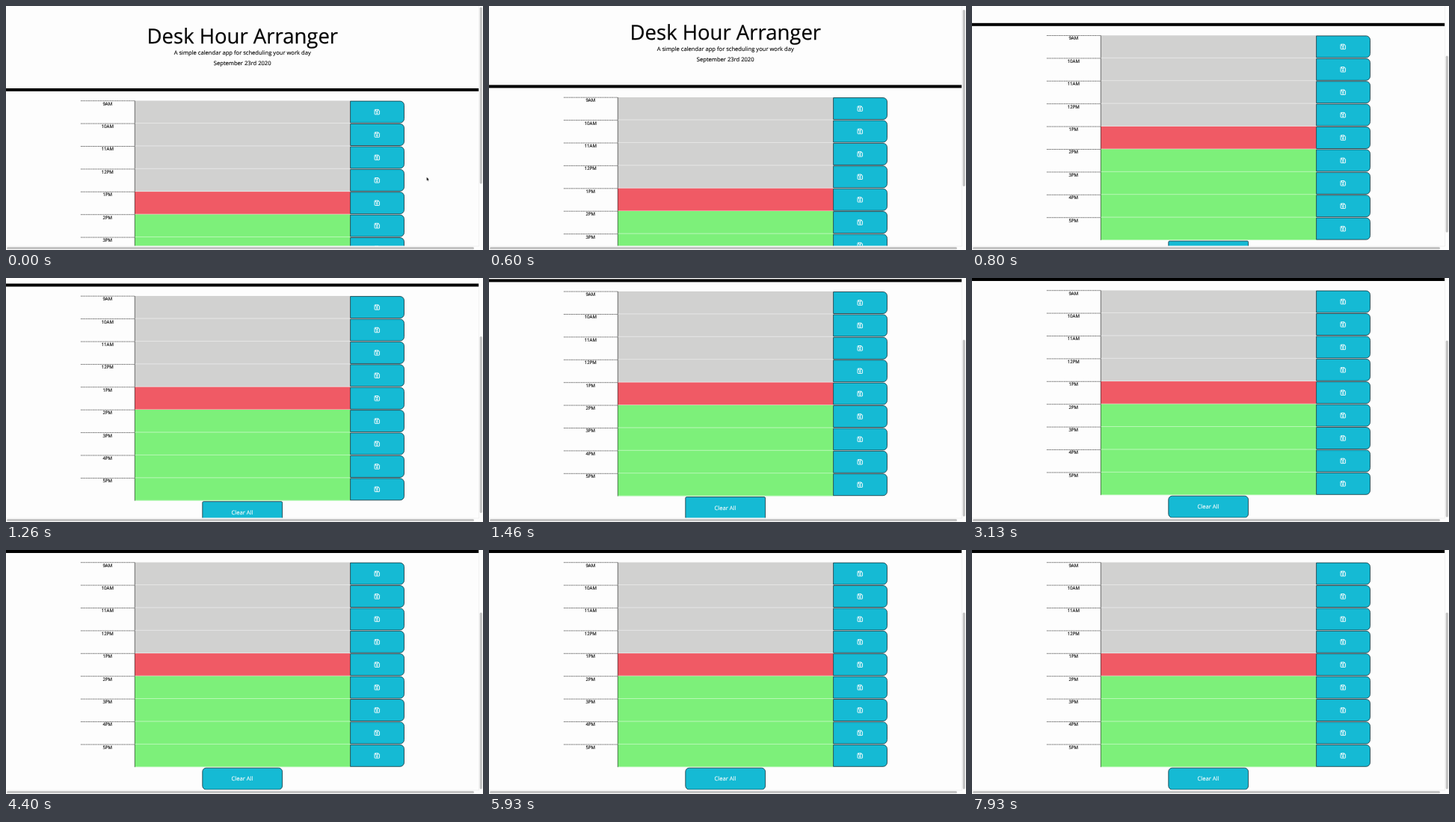
Animation of 638x326 px, one loop 8000 ms. Source, as an HTML page:

```html
<!DOCTYPE html>
<html lang="en">
<head>
<meta charset="utf-8">
<title>Day planner</title>
<style>
  @property --scroll { syntax: "<number>"; inherits: true; initial-value: 0; }

  html, body { margin: 0; width: 100%; height: 100%; overflow: hidden; background: #fdfdfd; }
  #stage {
    display: block; width: 638px; height: 326px;
    font-family: "Open Sans", "Noto Sans", sans-serif;
    text-rendering: geometricPrecision;
    animation: scroll 8s step-end infinite;
  }
  text { text-anchor: middle; fill: #050505; }
  .title { font-size: 27.5px; stroke: #050505; stroke-width: .25; }
  .lead { font-size: 7.6px; stroke: #050505; stroke-width: .12; }
  .hour { font-size: 6.08px; stroke: #050505; stroke-width: .12; }
  .light { fill: #fff; stroke: #fff; }
  .past { fill: #d1d1d0; }
  .present { fill: #f05a65; }
  .future { fill: #7df07a; }
  .button { fill: #15bad4; stroke: #17333a; stroke-width: .8; }
  .icon { fill: none; stroke: #fff; stroke-width: .85; stroke-linejoin: round; }
  .thumb { fill: #c2c2c2; }

  #page { transform: translateY(calc(var(--scroll) * -1px)); }
  #thumb { transform: translateY(calc(var(--scroll) * .745px)); }
  #pointer { animation: pointer 8s step-end infinite; }
  #clear { animation: corners 8s step-end infinite; }

  @keyframes scroll {
    0% { --scroll: 0; }
    6.625% { --scroll: 1.5; }
    7.5% { --scroll: 4.5; }
    8.25% { --scroll: 24; }
    9.125% { --scroll: 58; }
    10% { --scroll: 87.2; }
    10.75% { --scroll: 97; }
    15% { --scroll: 99.5; }
    15.75% { --scroll: 102.5; }
    16.625% { --scroll: 105.5; }
    17.5% { --scroll: 107.5; }
    18.25% { --scroll: 108.6; }
    19.125% { --scroll: 109.5; }
    20%, 100% { --scroll: 110; }
  }
  @keyframes pointer {
    0% { visibility: visible; }
    3.25%, 100% { visibility: hidden; }
  }
  @keyframes corners {
    0% { rx: 1.5px; }
    20%, 100% { rx: 5px; }
  }
</style>
</head>
<body>
<svg id="stage" viewBox="0 0 638 326">
  <defs>
    <g id="save">
      <path class="button" d="M460.6.6h66.5a5.4 5.4 0 0 1 5.4 5.4v18.2a5.4 5.4 0 0 1-5.4 5.4h-66.5z"/>
      <g class="icon" transform="translate(496.3 15.1) scale(1.08)">
        <path d="M-3-2.5q0-.5.5-.5H1.6L3-1.6V2.5q0 .5-.5.5h-5q-.5 0-.5-.5z"/>
        <path d="M-1.7-2.9v1.8H1.2V-2.9"/>
        <circle cy="1" r=".9"/>
      </g>
    </g>
  </defs>
  <rect width="638" height="326" fill="#fdfdfd"/>
  <svg width="632.3" height="320.6">
    <g id="page">
      <text class="title" x="316.3" y="49.7">Desk Hour Arranger</text>
      <text class="lead" x="316.2" y="64.8">A simple calendar app for scheduling your work day</text>
      <text class="lead" x="316.2" y="78.6">September 23rd 2020</text>
      <rect y="110" width="633" height="4"/>
      <g id="rows"></g>
      <rect id="clear" class="button" x="262.8" y="401.2" width="106.8" height="28.9"/>
      <text class="lead light" x="316" y="418.3">Clear All</text>
    </g>
  </svg>
  <path d="M632.6 0V321H0" fill="none" stroke="#e8e8e8" stroke-width=".6"/>
  <rect id="thumb" class="thumb" x="633.7" y="1.6" width="3.2" height="236" rx="1.6"/>
  <rect class="thumb" x="1" y="321.9" width="625" height="3" rx="1.5"/>
  <path id="pointer" d="M562.7 228.8v4.4l1-.9.7 1.6.7-.3-.7-1.6h1.4z" fill="#111"/>
</svg>
<script>
  const FIRST = 126.5, PITCH = 30.4, PRESENT = 4;
  const hours = ["9AM", "10AM", "11AM", "12PM", "1PM", "2PM", "3PM", "4PM", "5PM"];

  const row = (hour, i) => {
    const state = i < PRESENT ? "past" : i > PRESENT ? "future" : "present";
    return `<g transform="translate(0 ${FIRST + i * PITCH})">
      <path d="M100 .2H172" stroke="#222" stroke-width=".7" stroke-dasharray="1.5 .8"/>
      <text class="hour" x="135.8" y="6.2">${hour}</text>
      <rect class="${state}" x="172" width="288.6" height="${PITCH}"/>
      <path d="M172 30H460.6" stroke="#fff" stroke-opacity=".55" stroke-width=".8"/>
      <path d="M172.3 0V${PITCH}" stroke="#222" stroke-width=".6"/>
      <use href="#save"/>
    </g>`;
  };

  document.getElementById("rows").innerHTML = hours.map(row).join("");
</script>
</body>
</html>
```
